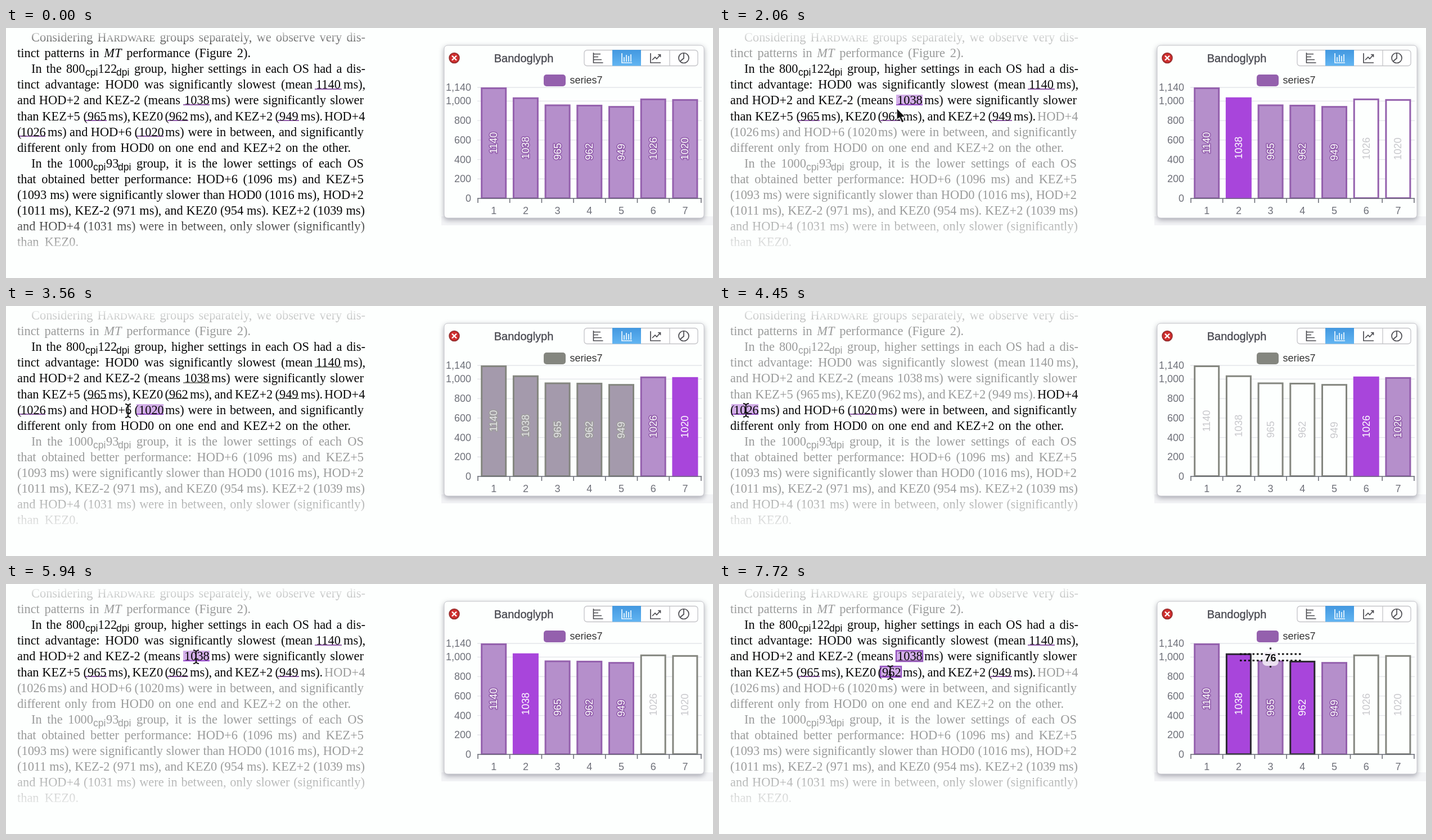
These frames come from a looping animation (1257x446 px, 7820 ms). An HTML page:

```html
<!DOCTYPE html>
<html lang="en">
<head>
<meta charset="utf-8">
<title>Text and chart linking</title>
<style>
  html, body { margin: 0; width: 100%; height: 100%; overflow: hidden; background: #fdfffe; }
  svg { display: block; width: 1257px; height: 446px; }
  text { white-space: pre; }
  .prose { font: 22.4px "Liberation Serif", serif; fill: #080808; }
  .prose .sub { font: 17.5px "Liberation Sans", sans-serif; }
  .caps { font-size: 17.5px; }
  .chart { font: 18px "Liberation Sans", sans-serif; fill: #6e7079; }
  .label { paint-order: stroke; stroke-linejoin: round; stroke-width: 3.5; text-anchor: middle; }
</style>
</head>
<body>
<svg id="stage" viewBox="0 0 1257 446">
  <defs>
    <linearGradient id="top" x2="0" y2="1">
      <stop stop-color="#fdfffe"/><stop offset="1" stop-color="#fdfffe" stop-opacity="0"/>
    </linearGradient>
    <linearGradient id="bottom" x2="0" y2="1">
      <stop stop-color="#fdfffe" stop-opacity="0"/><stop offset="1" stop-color="#fdfffe"/>
    </linearGradient>
    <linearGradient id="blue" x2="0" y2="1">
      <stop stop-color="#4398e0"/><stop offset="1" stop-color="#62b5f2"/>
    </linearGradient>
  </defs>
  <g id="marks"></g>
  <g class="prose"><g id="other"></g><g id="first"></g><g id="second"></g></g>
  <rect width="650" height="38" fill="url(#top)"/>
  <rect y="330" width="650" height="80" fill="url(#bottom)"/>

  <rect x="774" y="336" width="483" height="16" fill="#ededf2" opacity=".6"/>
  <rect x="779" y="31" width="462" height="308" rx="6" fill="#fdfffe" stroke="#c6c6cc"
    style="filter:drop-shadow(0 3px 5px rgba(50,50,70,.4))"/>
  <circle cx="797" cy="53.5" r="9" fill="#cf2f2f" stroke="#8f2b2b" stroke-width="1.5"/>
  <path d="M793 49.5l8 8m0-8l-8 8" stroke="#fff" stroke-width="2.4"/>
  <g class="chart">
    <text x="920.5" y="61" text-anchor="middle" font-size="20" fill="#46464e" stroke="#46464e" stroke-width=".3">Bandoglyph</text>
    <rect x="1028" y="39.5" width="202" height="28" rx="5" fill="#fff" stroke="#c4c4c8" stroke-width="1.3"/>
    <path d="M1180 40v27" stroke="#c4c4c8" stroke-width="1.3"/>
    <rect x="1078" y="39" width="51" height="28.5" fill="url(#blue)"/>
    <g fill="none" stroke="#4b4b50" stroke-width="1.7">
      <path d="M1044.500 44v18h17M1045 46.500h12M1045 51.500h8M1045 56.500h14"/>
      <path d="M1095 45v17h18M1099 60v-8M1103 60v-12M1107 60v-10M1111 60v-13" stroke="#eef8ff"/>
      <path d="M1146 45v17h18M1149 57l5-5 3 3 6-7M1159 47.500h4.500v4.500"/>
      <circle cx="1205" cy="53.500" r="9"/><path d="M1205 45v9l-6 5"/>
    </g>
    <rect id="key" x="956" y="83" width="39" height="21" rx="5"/>
    <text x="1002.500" y="99" fill="#333">series7</text>
    <g id="axes"></g><g id="bars"></g>
    <path id="axis" fill="none" stroke="#6e7079" stroke-width="1.6"/>
    <g id="diff">
      <path d="M926 125h112M926 136.500h112" stroke="#111" stroke-width="3" stroke-dasharray="3.500 4"/>
      <rect x="966" y="121" width="29" height="25" rx="8" fill="#f4f0f8" opacity=".85"/>
      <path d="M979 115h3M979 147.500h3" stroke="#111" stroke-width="3"/>
      <text x="980.500" y="137.500" text-anchor="middle" font-weight="bold" fill="#111">76</text>
    </g>
  </g>

  <circle id="ring" r="25" fill="none" stroke="#111" stroke-width="2.4"/>
  <g id="pointer" stroke-linejoin="round">
    <path id="beam" fill="none" stroke="#111" stroke-width="1.9"
      d="M-5-12q4 0 5 3q1-3 5-3M0-9V9M-5 12q4 0 5-3q1 3 5 3M-3 4h6"/>
    <path id="arrow" fill="#111" stroke="#fff" stroke-width="1.3" d="M0 0V21l5-4 4 9 4-2-4-8h7z"/>
  </g>
</svg>
<script>
const $ = id => document.getElementById(id);
const set = (el, attrs) => { for (const k in attrs) el.setAttribute(k, attrs[k]); return el; };
const add = (parent, tag, attrs, html = "") => {
  const el = set(document.createElementNS("http://www.w3.org/2000/svg", tag), attrs);
  el.innerHTML = html;
  return parent.appendChild(el);
};

// Prose: [line, left, right, text]; a right edge justifies by word spacing.
const prose = {
  other: [
    [0, 45, 639, 'Considering H<tspan class="caps">ARDWARE</tspan> groups separately, we observe very dis-'],
    [1, 20, 435, 'tinct patterns in <tspan font-style="italic">MT</tspan> performance (Figure 2).'],
    [8, 45, 155, "In the 1000"], [8, 155, 0, "_cpi"], [8, 178, 0, "93"], [8, 199, 0, "_dpi"],
    [8, 232, 636, "group, it is the lower settings of each OS"],
    [9, 20, 636, "that obtained better performance: HOD+6 (1096 ms) and KEZ+5"],
    [10, 20, 636, "(1093 ms) were significantly slower than HOD0 (1016 ms), HOD+2"],
    [11, 20, 638, "(1011 ms), KEZ-2 (971 ms), and KEZ0 (954 ms). KEZ+2 (1039 ms)"],
    [12, 20, 638, "and HOD+4 (1031 ms) were in between, only slower (significantly)"],
    [13, 20, 129, "than KEZ0."]
  ],
  first: [
    [2, 45, 140.5, "In the 800"], [2, 141, 0, "_cpi"], [2, 163.5, 0, "122"], [2, 196, 0, "_dpi"],
    [2, 228, 639, "group, higher settings in each OS had a dis-"],
    [3, 20, 545, "tinct advantage: HOD0 was significantly slowest (mean"], [3, 551, 0, "1140"], [3, 600, 0, "ms),"],
    [4, 20, 310, "and HOD+2 and KEZ-2 (means"], [4, 317, 0, "1038"], [4, 365, 636, "ms) were significantly slower"],
    [5, 20, 145, "than KEZ+5 ("], [5, 145, 0, "965"], [5, 182, 290, "ms), KEZ0 ("], [5, 290, 0, "962"],
    [5, 327, 486, "ms), and KEZ+2 ("], [5, 486, 0, "949"], [5, 524, 0, "ms)."]
  ],
  second: [
    [5, 566, 0, "HOD+4"], [6, 20, 0, "("], [6, 26, 0, "1026"], [6, 74, 236, "ms) and HOD+6 ("], [6, 236, 0, "1020"],
    [6, 283, 636, "ms) were in between, and significantly"],
    [7, 20, 613, "different only from HOD0 on one end and KEZ+2 on the other."]
  ]
};
for (const id in prose) for (const [line, left, right, words] of prose[id]) {
  const sub = words[0] === "_";
  const el = add($(id), "text", { x: left, y: 24 + 28.1 * line + (sub ? 5 : 0), class: sub ? "sub" : "" },
    sub ? words.slice(1) : words);
  const gaps = el.textContent.split(" ").length - 1;
  if (right) el.style.wordSpacing = (right - left - el.getComputedTextLength()) / gaps + "px";
}

// Linked values: value, left edge, width and underline of its mark in the text.
const data = [[1140, 549, 48, 109], [1038, 315, 47, 137], [965, 141, 38, 165], [962, 287, 37, 165],
  [949, 483, 38, 165], [1026, 22, 48, 193], [1020, 232, 48, 193]];
const zero = 304, pitch = 56.7;
const yOf = v => zero - v * 198 / 1140;

for (const v of [0, 200, 400, 600, 800, 1000, 1140]) {
  add($("axes"), "path", { d: `M838 ${yOf(v)}H1237`, stroke: "#e3e4e9", "stroke-width": 1.3 });
  add($("axes"), "text", { x: 827, y: yOf(v) + 6, "text-anchor": "end" }, v.toLocaleString("en-US"));
}
let ticks = `M838 ${zero}H1237`;
for (let i = 0; i < 8; i++) ticks += `M${839 + pitch * i} ${zero}v8`;
set($("axis"), { d: ticks });

const items = data.map(([v, x, w, y], i) => {
  const cx = 867.2 + pitch * i, cy = (zero + yOf(v)) / 2;
  add($("axes"), "text", { x: cx, y: 332, "text-anchor": "middle" }, i + 1);
  return {
    bar: add($("bars"), "rect", { x: cx - 21.5, y: yOf(v) + 1.5, width: 43, height: zero - yOf(v) - 2, "stroke-width": 3 }),
    label: add($("bars"), "text", { class: "label", transform: `translate(${cx + 6} ${cy}) rotate(-90)` }, v),
    glow: add($("marks"), "rect", { x, y: y - 18, width: w, height: 19, fill: "#d2aee8", "stroke-width": 2.4 }),
    line: add($("marks"), "path", { d: `M${x} ${y}h${w}`, "stroke-width": 2.2 })
  };
});

// Linear value from a table of [position, value...] rows.
const track = (rows, p, col = 1) => {
  const j = rows.findIndex(r => r[0] > p);
  if (j < 0) return rows[rows.length - 1][col];
  if (j === 0) return rows[0][col];
  const a = rows[j - 1], b = rows[j];
  return a[col] + (b[col] - a[col]) * (p - a[0]) / (b[0] - a[0]);
};
const rgb = hex => [1, 3, 5].map(i => parseInt(hex.slice(i, i + 2), 16));
const mix = (a, b, k) => {
  const q = rgb(b);
  return "#" + rgb(a).map((c, i) => Math.round(c + (q[i] - c) * k).toString(16).padStart(2, "0")).join("");
};

const PURPLE = "#9460ad", HOT = "#a845db", GREY = "#84867f", BLACK = "#2b2831";
const fills = [[0, "#fdfffe"], [.35, "#e9e7ed"], [.55, "#a49aac"], [.75, "#c99fe0"], [1, "#b58fcb"]];
const fillOf = k => {
  const j = Math.max(1, fills.findIndex(f => f[0] >= k));
  const [p, a] = fills[j - 1], [q, b] = fills[j];
  return mix(a, b, (k - p) / (q - p));
};

// Tables below count display steps of about 150 ms.
const clock = [[0, 0], [140, 1], [880, 6], [2060, 14], [3560, 24], [5350, 36], [6840, 46], [7720, 52], [7820, 52.6]];
const textFade = {
  other: [[3, 1], [6, .4]],
  first: [[24, 1], [26, .4], [33, .4], [35, 1]],
  second: [[4, 1], [6, .4], [22, .4], [23, 1], [33, 1], [36, .4]]
};
const barFade = [
  [[23, 1], [24, .55], [26, 0], [34, 0], [36, .55], [38, 1]],
  [[5, 1], [6, .35], [8, 0], [22, 0], [24, 1], [35, 1], [36, .75], [39, 0]]
];
const hovers = [[0, -1], [5, 0], [11, 1], [16, 3], [19, 4], [22, -1], [23, 6], [27, -1], [28, 5], [35, -1],
  [36, 3], [37, 1], [44, 3]];
const hover = n => hovers.reduce((v, [at, i]) => n >= at ? i : v, -1);
const pinned = (i, n) => i === 1 && n >= 42 || i === 3 && n >= 47;
const path = [[3, 640, -20], [6, 527, 95], [8, 572, 100], [10, 560, 104], [12, 380, 128], [14, 316, 143],
  [16, 305, 158], [18, 330, 160], [20, 500, 158], [22, 330, 176], [24, 217, 187], [26, 205, 187], [29, 48, 186],
  [33, 50, 186], [35, 270, 160], [36, 318, 137], [38, 338, 130], [42, 338, 130], [45, 304.5, 158]];

function draw(time) {
  const n = Math.floor(track(clock, time) + 1e-6);
  for (const id in textFade) $(id).setAttribute("opacity", track(textFade[id], n));

  items.forEach(({ bar, label, glow, line }, i) => {
    const second = i > 4;
    const level = track(barFade[+second], n);
    const pin = pinned(i, n);
    const heat = pin || hover(n - 1) === i ? 1 : hover(n - 2) === i ? .45 : 0;
    const grey = second ? n >= 38 : n >= 24 && n < 36;
    const base = grey ? GREY : PURPLE;
    const edge = pin ? BLACK : mix(base, HOT, heat);
    const fill = mix(fillOf(level), HOT, heat);
    set(bar, { fill, stroke: edge });
    set(label, {
      fill: mix("#c8c8cc", "#ffffff", Math.max(level, heat)),
      stroke: heat === 1 ? HOT : mix("#c4c0ca", edge, Math.min(1, Math.max(0, level * 2 - .5))),
      "stroke-opacity": level > 0 || heat ? 1 : 0
    });
    if (i === 0) $("key").setAttribute("fill", edge);

    const on = hover(n) === i;
    const shown = track(textFade[second ? "second" : "first"], n) > .7;
    set(glow, { opacity: on || pin ? 1 : 0, stroke: pin ? "#9150bd" : "none" });
    set(line, { stroke: on ? "#9b4fd0" : base, opacity: shown || on ? 1 : 0 });
  });

  const x = track(path, n, 1), y = track(path, n, 2);
  const pointing = n === 13 || n === 14;
  set($("pointer"), { transform: `translate(${x} ${y})`, opacity: n > 3 ? 1 : 0 });
  $("beam").setAttribute("opacity", pointing ? 0 : 1);
  $("arrow").setAttribute("opacity", pointing ? 1 : 0);
  set($("ring"), { cx: x, cy: y - 1, opacity: n === 41 || n === 42 || n === 46 || n === 47 ? 1 : 0 });
  $("diff").setAttribute("opacity", n >= 48 ? 1 : 0);
}

const start = performance.now();
function tick() {
  draw((performance.now() - start) % 7820);
  requestAnimationFrame(tick);
}
tick();
</script>
</body>
</html>
```
